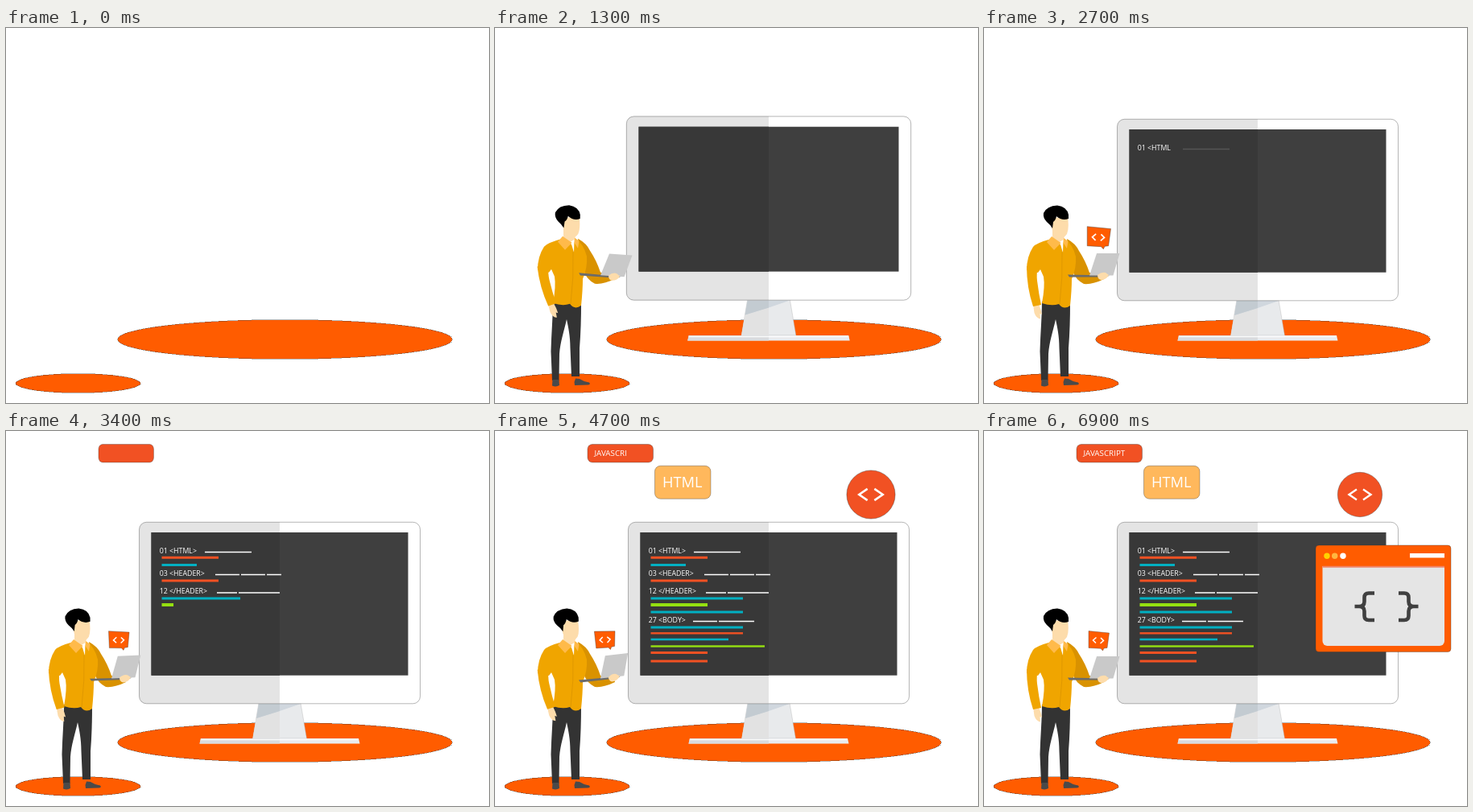
An HTML page for the animation above (8100 ms loop, 600 px wide and 466 px high).

```html
<!DOCTYPE html>
<html lang="en">
<head>
<meta charset="utf-8">
<title>Web development</title>
<style>
  html, body { margin: 0; width: 100%; height: 100%; overflow: hidden; background: #fff; }
  svg { display: block; width: 600px; height: 466px; }
  text { font-family: "Open Sans", "Noto Sans", sans-serif; fill: #fff; white-space: pre; }
  .edge { stroke: #333; stroke-width: .6; stroke-opacity: .6; }
  .floor { shape-rendering: crispEdges; }
  .orange { fill: #ff5c00; }
  .red { fill: #f15123; }
  .shirt { fill: #f0a500; }
  .skin { fill: #fddcab; }
  .pants { fill: #333; }
  .shoe { fill: #4a4a4a; }
  .mark { fill: none; stroke: #fff; }
  .tag { font-weight: 500; }
</style>
</head>
<body>
<svg viewBox="0 0 600 466">
  <ellipse class="orange edge floor" cx="346.5" cy="387" rx="208" ry="24.5"/>
  <ellipse class="orange edge floor" cx="89.5" cy="441.5" rx="77.5" ry="12"/>

  <g id="monitor">
    <path d="M314 338H366L373.500 382H306.500Z" fill="#e8eaec" class="edge" style="stroke:#aaa"/>
    <path d="M314 338H340V382H306.500Z" fill="#e2e2e2"/>
    <path d="M314 339H366L340 348L311 357Z" fill="#d0d7de"/>
    <path d="M314 339H340V348L311 357Z" fill="#c3cbd1"/>
    <path d="M242 382H438L439.500 388.500H240.500Z" fill="#e9ebee"/>
    <path d="M242 382H340V388.500H240.500Z" fill="#d9dbde"/>
    <path d="M242 383.500H438" stroke="#fafafa" stroke-width="1.500"/>
    <rect x="165.500" y="113.300" width="349" height="225.500" rx="9" fill="#fff"/>
    <path d="M340 113.300H174.500a9 9 0 0 0-9 9V329.800a9 9 0 0 0 9 9H340Z" fill="#e4e4e4"/>
    <rect x="165.500" y="113.300" width="349" height="225.500" rx="9" fill="none" class="edge"/>
    <rect x="180.500" y="126" width="319" height="177.700" fill="#3f3f3f"/>
    <rect x="180.500" y="126" width="159.500" height="177.700" fill="#383838"/>
  </g>
  <g id="code"></g>

  <g id="man">
    <path class="pants" d="M72 340L107 341C107 360 106.500 380 105 398L105 433H95L93.500 398C93.500 382 91 372 89 362C86 376 81 390 80 405L79.500 438H71L69.500 402C70 380 72 360 72 340Z"/>
    <path class="shoe" d="M71.500 437H79.500L80 444Q76 446.500 71 444.500Z"/>
    <path class="shoe" d="M98.500 440L100 435.500L105 436Q111 440 117 440.500Q119.500 443 115 443.500L99 444Z"/>
    <g id="arm">
      <path class="skin" d="M61 343L68 343L70.500 350L72 356L69.500 355L70 361.500Q65 361 62.500 354Z"/>
      <path class="shirt" d="M53 296L67 292Q65 308 66 314Q68 330 71 344L61 346Q53 322 53 296Z"/>
    </g>
    <path fill="#d99200" d="M103 262Q114 268 118 277Q126 289 131 304L148 306L149 312Q135 319 124 318Q114 313 110 302Z"/>
    <path class="shirt" d="M84 262Q65 267 61 272Q53 284 53 301L67 304L70 300L74 309Q76 321 72 342Q84 346 93 343Q99 351 107 345Q109 326 109 312Q115 298 114 284Q110 268 100 262Z"/>
    <path class="skin" d="M85 250L100 256L99 266L96 270L85 262Z"/>
    <path fill="#fff" d="M94 266L98.500 263L98 279Z"/>
    <path fill="#ffba4a" d="M84 259L95.500 267L87 276L78 266ZM99 261L104.500 265L103 274L98.500 267Z"/>
    <path d="M97 278Q98 310 94 343" fill="none" stroke="#d99200" stroke-width=".7"/>
    <g id="head">
      <path class="skin" d="M84 236L104 235Q106 249 103 256Q98 263 93 260Q85 257 84 247Z"/>
      <path d="M85 249Q82 244 78 241Q73 236 74 230Q78 221 91 220.500Q103 222 105 232L105 237Q97 240 90 234Q89 239 86 241Z"/>
    </g>
    <g id="laptop">
      <path d="M104 306.500L156 307.500L152 309.500H106Z" fill="#6b6b6b"/>
      <path d="M140 280H168.500L160.500 307.500H131Z" fill="#c9c9c9"/>
      <path class="skin" d="M141 307Q146 302.500 151 304L155 307Q152 313 145 313Q141 312 141 307Z"/>
      <g id="bubble">
        <path class="orange edge" stroke-linejoin="round" d="M130 248.500L155.500 251L153 269.500L149 270L147.500 273L145 270.300L130 269.500Z"/>
        <path class="mark" stroke-width="1.500" d="M139.500 256.500L135.500 260L139 263.500M145 257L148.500 260.500L144.500 264"/>
      </g>
    </g>
  </g>

  <g id="scriptTag">
    <rect class="red edge" x="115" y="16.500" width="81.500" height="22.500" rx="6"/>
    <text id="scriptText" class="tag" x="123.500" y="31.300" font-size="9.800"></text>
  </g>
  <g id="htmlTag">
    <rect class="edge" x="198.500" y="43.300" width="69.500" height="41" rx="7" fill="#ffb85c"/>
    <text id="htmlText" class="tag" x="208" y="70" font-size="18.300"></text>
  </g>
  <g id="badge">
    <circle class="red edge" cx="467" cy="79" r="27.700"/>
    <path class="mark" stroke-width="2.400" d="M463 72.500L453.500 79L463 85.500M471 72.500L480.500 79L471 85.500"/>
  </g>
  <g id="window">
    <rect class="orange edge" x="412" y="142" width="168" height="132.500" rx="4"/>
    <path d="M420.500 168H572V261a6 6 0 0 1-6 6H426.500a6 6 0 0 1-6-6Z" fill="#e5e5e5"/>
    <path d="M420.500 168.800H572" stroke="#f08468" stroke-width="2"/>
    <circle cx="426" cy="155.300" r="3.700" fill="#ffd200"/>
    <circle cx="435.700" cy="155.300" r="3.700" fill="#ffb640"/>
    <circle cx="446" cy="155.300" r="3.700" fill="#fff"/>
    <rect x="529" y="152" width="43" height="5.500" fill="#fff"/>
    <path fill="none" stroke="#404040" stroke-width="4.600" d="M485 201.500H478Q472.500 201.500 472.500 207V212Q472.500 218 466 218H460.500M466 218Q472.500 218 472.500 224V229.500Q472.500 235 478 235H485M515 201.500H522Q527.500 201.500 527.500 207V212Q527.500 218 534 218H539.500M534 218Q527.500 218 527.500 224V229.500Q527.500 235 522 235H515"/>
  </g>
</svg>
<script>
const LOOP = 8100;
const $ = id => document.getElementById(id);
const clamp = v => Math.max(0, Math.min(1, v));
const progress = (t, start, length) => clamp((t - start) / length);

const RED = '#f15123', CYAN = '#00b0c2', LIME = '#95e010';
// Text rows: [y, text, underline spans]; bars: [y, right end, colour, height]
const rows = [
  [148, '01 <HTML>', [[247, 305]]],
  [157.3, 264, RED, 3], [166.5, 237, CYAN, 3],
  [176, '03 <HEADER>', [[260, 290], [292, 322], [324, 342]]],
  [186, 264, RED, 3],
  [198.5, '12 </HEADER>', [[262, 287], [289, 340]]],
  [208, 308, CYAN, 3], [216, 264, LIME, 4], [225, 308, CYAN, 3],
  [234, '27 <BODY>', [[246, 276], [278, 322]]],
  [244, 308, CYAN, 3], [251.3, 308, RED, 2.4], [259, 290, CYAN, 2.6],
  [267.5, 335, LIME, 2.4], [275.5, 264, RED, 3], [286, 264, RED, 3]
];

function add(tag, attributes) {
  const node = document.createElementNS('http://www.w3.org/2000/svg', tag);
  for (const key in attributes) node.setAttribute(key, attributes[key]);
  return $('code').appendChild(node);
}

function type(node, text, p) {
  node.textContent = text.slice(0, Math.floor(text.length * p));
}

// Each row becomes a function that draws it at a given time; bars start a little after text.
const drawRow = rows.map(([y, content, extra, height], i) => {
  const start = 2506 + i * 103;
  if (typeof content === 'string') {
    const label = add('text', { x: 190.7, y: y + 3.5, 'font-size': 8.8 });
    const d = extra.map(([from, to]) => `M${from} ${y + 2.5}H${to}`).join('');
    const line = add('path', { d, stroke: '#fff', 'stroke-width': 1.4 });
    return t => {
      const p = progress(t, start, 200);
      type(label, content, p);
      line.setAttribute('opacity', p < 1 ? p * .15 : 1);
    };
  }
  const bar = add('rect', { x: 193.5, y: y - height / 2, height, fill: extra });
  return t => bar.setAttribute('width', (content - 193.5) * progress(t, start + 94, 200) ** 1.7);
});

function backOut(p, s) {
  const q = p - 1;
  return 1 + (s + 1) * q ** 3 + s * q * q;
}

function scale(id, x, y, sx, sy = sx) {
  $(id).setAttribute('transform', `translate(${x} ${y}) scale(${sx} ${sy}) translate(${-x} ${-y})`);
}

function rotate(id, x, y, angle) {
  $(id).setAttribute('transform', `rotate(${angle} ${x} ${y})`);
}

function follow(keys, t) {
  const next = keys.findIndex(key => key[0] > t);
  if (next < 0) return keys[keys.length - 1][1];
  const [t0, a] = keys[next - 1], [t1, b] = keys[next];
  return a + (b - a) * (t - t0) / (t1 - t0);
}

const tilt = [[0, 0], [800, 0], [1800, 8], [2700, 0], [4000, -4.5], [5300, -8], [6900, 0]];
const armSwing = [[0, -13], [800, -13], [1800, 0], [2700, 0], [4000, -4], [5300, -6], [6900, 0]];

function draw(t) {
  scale('monitor', 340, 388, backOut(progress(t, 0, 1480), 1.1));
  scale('man', 88, 445, backOut(progress(t, 0, 1350), 1.1));
  const angle = follow(tilt, t);
  rotate('laptop', 132, 308, angle);
  rotate('head', 92, 265, angle * .35);
  rotate('arm', 60, 300, follow(armSwing, t));
  scale('bubble', 142, 261, backOut(progress(t, 2100, 1000), 2.2));

  drawRow.forEach(row => row(t));

  scale('scriptTag', 115, 28, 1 - (1 - progress(t, 3100, 500)) ** 2, t < 3100 ? 0 : 1);
  type($('scriptText'), 'JAVASCRIPT', progress(t, 4100, 700));
  scale('htmlTag', 233, 64, backOut(progress(t, 3600, 800), 1.7));
  type($('htmlText'), 'HTML', progress(t, 4200, 500));
  scale('badge', 467, 79, backOut(progress(t, 4300, 800), 1.7));
  scale('window', 496, 208, t < 5400 ? backOut(progress(t, 4800, 1000), 1.54) : 1);
}

// The picture advances ten times a second, with a short rest and a long final hold.
function steppedTime(t) {
  if (t >= 6900) return 6900;
  if (t >= 5500 && t < 5800) return 5500;
  return Math.floor(t / 100) * 100;
}

const start = performance.now();
function tick() {
  draw(steppedTime((performance.now() - start) % LOOP));
  requestAnimationFrame(tick);
}
tick();
</script>
</body>
</html>
```
